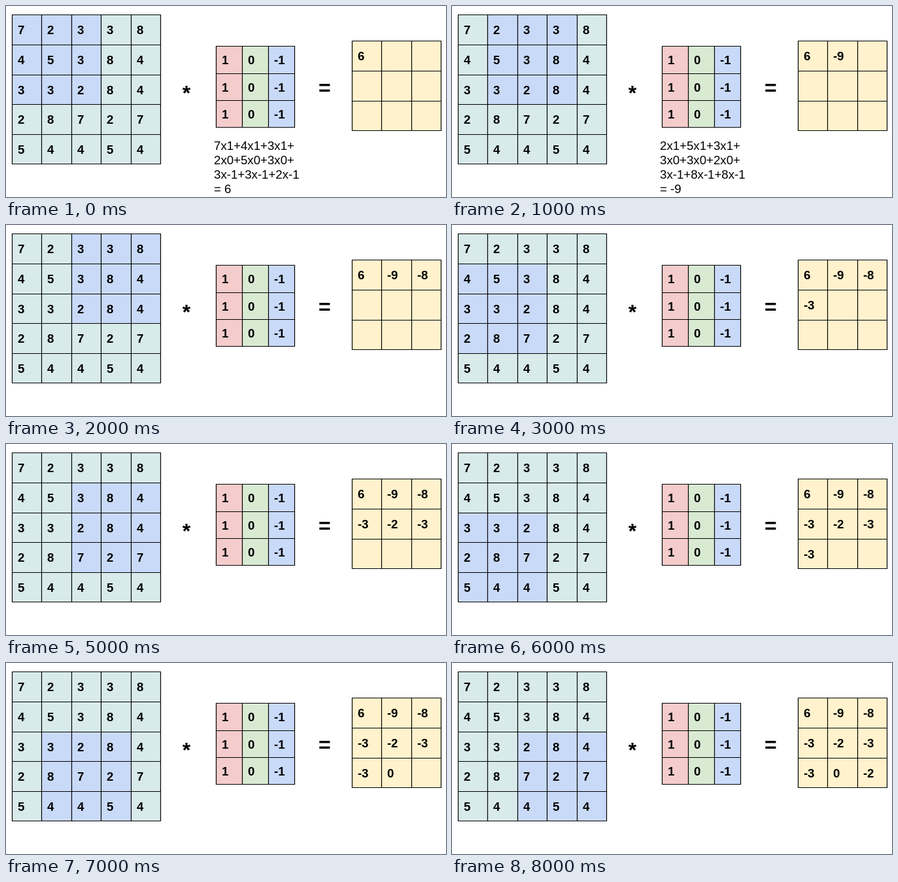
An HTML page for the animation above (9 s loop, 673 by 292 pixels).

```html
<!DOCTYPE html>
<html lang="en">
<head>
<meta charset="utf-8">
<title>Convolution</title>
<style>
  html, body { margin: 0; width: 100%; height: 100%; overflow: hidden; background: #fff; }
  svg { display: block; }
  text { font: 18.67px "Liberation Sans", Arial, sans-serif; white-space: pre; }
  .bold { font-weight: bold; }
  .operator { font-weight: bold; font-size: 32px; text-anchor: middle; }
  line { stroke: #000; stroke-width: 1.2; }
</style>
</head>
<body>
<svg id="stage" width="673" height="292" viewBox="0 0 673 292"></svg>
<script>
const STEP = 1000, SIZE = 3, STEPS = SIZE * SIZE;
const BLUE = "#c9daf8", TEAL = "#d8eaea", YELLOW = "#fff2cc";
const KERNEL_COLORS = ["#f4cccc", "#d9ead3", BLUE];

const input = ["72338", "45384", "33284", "28727", "54454"].map(row => [...row].map(Number));
const weights = [1, 0, -1];
const stage = document.getElementById("stage");

function add(tag, attributes, content = "") {
  const node = document.createElementNS("http://www.w3.org/2000/svg", tag);
  for (const name in attributes) node.setAttribute(name, attributes[name]);
  node.textContent = content;
  return stage.appendChild(node);
}

// Draws a table and returns its cells by row and column.
function makeGrid(xs, ys, padX, baseline, fill, value) {
  const cells = ys.slice(1).map((bottom, r) => xs.slice(1).map((right, c) => {
    const x = xs[c], y = ys[r];
    const box = add("rect", { x, y, width: right - x, height: bottom - y, fill: fill(r, c) });
    const label = add("text", { x: x + padX, y: y + baseline, class: "bold" }, value(r, c));
    return { box, label };
  }));
  const [left, right] = [xs[0] - .5, xs[xs.length - 1] + .5];
  const [top, bottom] = [ys[0] - .5, ys[ys.length - 1] + .5];
  for (const x of xs) add("line", { x1: x, x2: x, y1: top, y2: bottom });
  for (const y of ys) add("line", { x1: left, x2: right, y1: y, y2: y });
  return cells;
}

const inputCells = makeGrid(
  [9.5, 54.5, 100.5, 145.5, 191.5, 236.5], [13.5, 59.5, 105.5, 150.5, 196.5, 241.5],
  8.4, 29.9, () => TEAL, (r, c) => input[r][c]);
makeGrid([321.5, 361.5, 401.5, 441.5], [61.5, 103.5, 144.5, 185.5],
  8.5, 27.7, (r, c) => KERNEL_COLORS[c], (r, c) => weights[c]);
const resultCells = makeGrid([529.5, 574.5, 620.5, 665.5], [53.5, 99.5, 145.5, 190.5],
  8.4, 29.9, () => YELLOW, () => "");

add("text", { x: 276, y: 144, class: "operator" }, "*");
add("text", { x: 487.3, y: 136, class: "operator" }, "=");
const notes = [0, 1, 2, 3].map(i => add("text", { x: 318, y: 219.8 + i * 22 }));

function windowColumn(step, c) {
  const top = Math.floor(step / SIZE), left = step % SIZE;
  return [0, 1, 2].map(r => input[top + r][left + c]);
}

function convolve(step) {
  return weights.reduce((total, w, c) =>
    total + w * windowColumn(step, c).reduce((a, b) => a + b), 0);
}

function explain(step) {
  const terms = weights.map((w, c) => windowColumn(step, c).map(v => `${v}x${w}`).join("+"));
  return [terms[0] + "+", terms[1] + "+", terms[2], "= " + convolve(step)];
}

function show(step) {
  const top = Math.floor(step / SIZE), left = step % SIZE;
  inputCells.forEach((row, r) => row.forEach(({ box }, c) => {
    const inside = r >= top && r < top + SIZE && c >= left && c < left + SIZE;
    box.setAttribute("fill", inside ? BLUE : TEAL);
  }));
  resultCells.flat().forEach(({ label }, i) => {
    label.textContent = i <= step ? convolve(i) : "";
  });
  // Only the first two positions spell out the sum.
  const lines = step < 2 ? explain(step) : [];
  notes.forEach((note, i) => { note.textContent = lines[i] || ""; });
}

const start = performance.now();
let current = -1;
function tick() {
  const step = Math.floor((performance.now() - start) / STEP) % STEPS;
  if (step !== current) show(current = step);
  requestAnimationFrame(tick);
}
tick();
</script>
</body>
</html>
```
